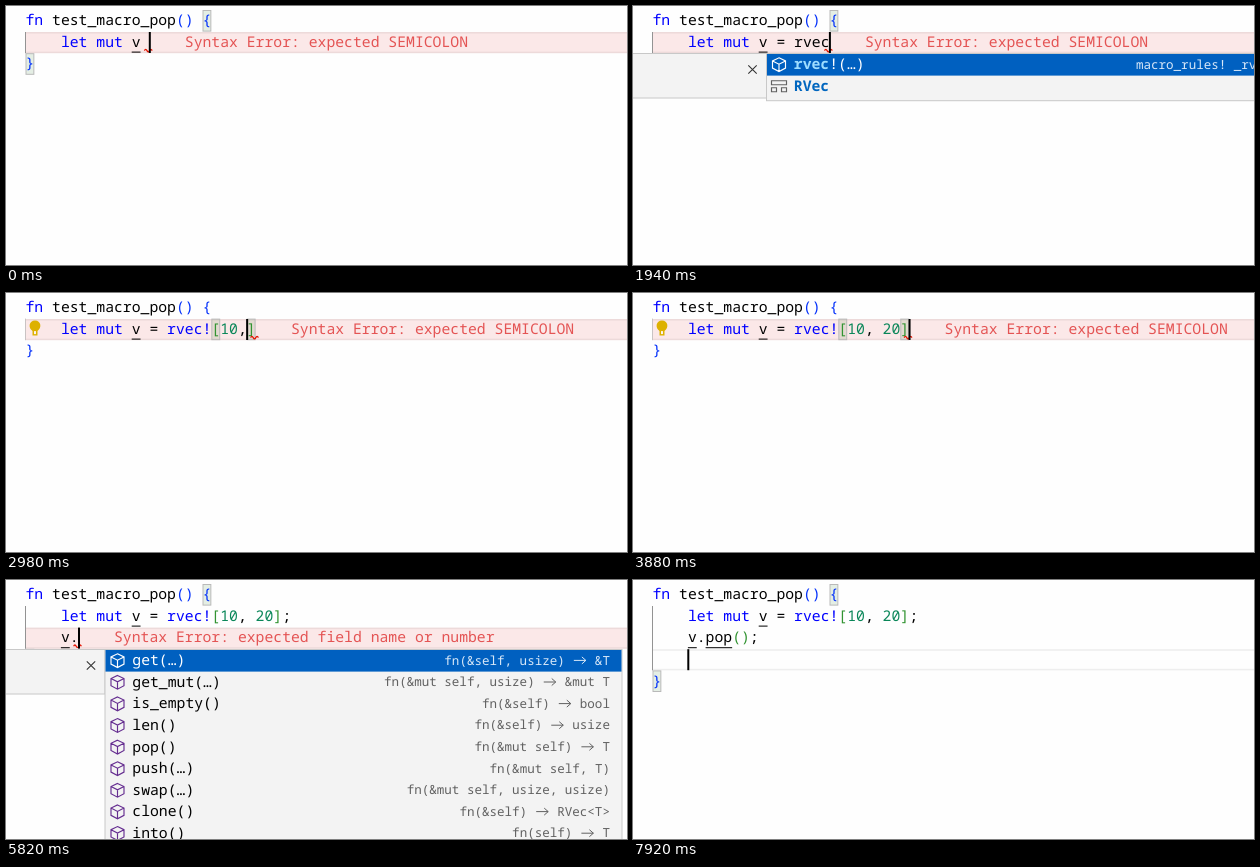
An HTML page for the animation above (8 s loop, 621x259 px).

```html
<!DOCTYPE html>
<html lang="en">
<head>
<meta charset="utf-8">
<title>Editor typing</title>
<style>
  html, body { margin: 0; width: 621px; height: 259px; overflow: hidden; background: #fefefe; }
  svg { display: block; }
  text {
    font: 14.75px "Noto Sans Mono", "DejaVu Sans Mono", monospace;
    white-space: pre;
    text-rendering: geometricPrecision;
    font-variant-ligatures: none;
  }
  text.detail { font-size: 12.55px; }
  .hit { font-weight: 700; }
</style>
</head>
<body>
<svg id="stage" width="621" height="259" viewBox="0 0 621 259"></svg>
<script>
const LOOP = 8000, CH = 8.85, SMALL = 7.53, ROW = 21.6, LEFT = 19.5;
const stage = document.getElementById('stage');
const colX = col => LEFT + col * CH;
const rowY = row => 4 + row * ROW;

const SEMI = 'Syntax Error: expected SEMICOLON';
const EXPR = 'Syntax Error: expected expression';
const DELIM = 'Syntax Error: expected `{`, `[`, `(`';
const FIELD = 'Syntax Error: expected field name or number';

// Completion entries: label, icon, signature
const macro = ['rvec!(…)', 'cube', 'macro_rules! _rvec'];
const struct = ['RVec', 'struct', ''];
const words = [
  ['range(…)', 'cube', 'fn(usize, usize) -> RVec<usize>'],
  ['range_r(…)', 'cube', 'fn(usize, usize) -> RVec<usize>'],
  ['return', 'keyword', ''],
  macro,
  struct,
  ['Result', 'enum', ''],
  ['RustcDecodable', 'ref', ''],
  ['RustcEncodable', 'ref', ''],
  ['AsRef', 'iface', ''],
  ['test_range_for(…)', 'cube', 'fn(usize, usize)']
];
const pop = ['pop()', 'cube', 'fn(&mut self) -> T'];
const push = ['push(…)', 'cube', 'fn(&mut self, T)'];
const methods = [
  ['get(…)', 'cube', 'fn(&self, usize) -> &T'],
  ['get_mut(…)', 'cube', 'fn(&mut self, usize) -> &mut T'],
  ['is_empty()', 'cube', 'fn(&self) -> bool'],
  ['len()', 'cube', 'fn(&self) -> usize'],
  pop,
  push,
  ['swap(…)', 'cube', 'fn(&mut self, usize, usize)'],
  ['clone()', 'cube', 'fn(&self) -> RVec<T>'],
  ['into()', 'cube', 'fn(self) -> T']
];
const menu = (x, query, items, doc = '') => ({ x, query, items, doc });

// Each step changes only the named parts of the state
const head = 'let mut v ';
const line = head + '= rvec![10, 20];';
const steps = [
  [0, { body: [head], back: 0, err: SEMI, caret: 1, pair: '{}', bulb: 0, hot: 0, menu: null }],
  [150, { body: [head + '='], err: EXPR }],
  [300, { body: [head + '= '] }],
  [750, { caret: 0 }],
  [1350, { body: [head + '= r'], caret: 1, err: SEMI }],
  [1490, { menu: menu(133.5, 'r', words, 'e>') }],
  [1640, { body: [head + '= rv'], menu: menu(133.5, 'rv', [macro, struct]) }],
  [1790, { body: [head + '= rve'], menu: menu(133.5, 'rve', [macro, struct]) }],
  [1940, { body: [head + '= rvec'], menu: menu(133.5, 'rvec', [macro, struct]) }],
  [2090, { body: [head + '= rvec!'], menu: menu(133.5, 'rvec!', [macro]) }],
  [2240, { err: DELIM, menu: null }],
  [2390, { body: [head + '= rvec![]'], back: 1, pair: '[]', bulb: 1 }],
  [2530, { err: SEMI }],
  [2680, { body: [head + '= rvec![1]'] }],
  [2830, { body: [head + '= rvec![10]'] }],
  [2980, { body: [head + '= rvec![10,]'] }],
  [3130, { body: [head + '= rvec![10, ]'] }],
  [3430, { body: [head + '= rvec![10, 2]'] }],
  [3580, { body: [head + '= rvec![10, 20]'] }],
  [3880, { back: 0 }],
  [4030, { body: [line], err: '', pair: '{}' }],
  [4330, { bulb: 0 }],
  [4480, { caret: 0 }],
  [4780, { body: [line, ''], caret: 1 }],
  [5220, { caret: 0 }],
  [5670, { body: [line, 'v'], caret: 1 }],
  [5820, { body: [line, 'v.'], err: FIELD, menu: menu(99, '', methods) }],
  [6120, { body: [line, 'v.p'], err: '', menu: menu(99, 'p', [pop, push, methods[2]]) }],
  [6270, { body: [line, 'v.po'], menu: menu(99, 'po', [pop]) }],
  [6420, { body: [line, 'v.pop'], menu: menu(99, 'pop', [pop]) }],
  [6720, { body: [line, 'v.pop()'], menu: null, pair: '()' }],
  [6870, { bulb: 1, hot: 1 }],
  [7170, { body: [line, 'v.pop();'], pair: '{}' }],
  [7470, { bulb: 0 }],
  [7620, { caret: 0 }],
  [7920, { body: [line, 'v.pop();', ''], caret: 1 }]
];

const esc = s => s.replace(/&/g, '&amp;').replace(/</g, '&lt;').replace(/>/g, '&gt;');
const text = (x, y, s, fill, cls = '') =>
  `<text x="${x}" y="${y}" fill="${fill}" class="${cls}">${esc(s)}</text>`;
const rect = (x, y, w, h, fill, more = '') =>
  `<rect x="${x}" y="${y}" width="${w}" height="${h}" fill="${fill}" ${more}/>`;
const path = (d, stroke, width = 1, fill = 'none') =>
  `<path d="${d}" stroke="${stroke}" stroke-width="${width}" fill="${fill}"/>`;

const icons = {
  cube: ['#652d90', 'M8 1.2 14.5 4.3V11.5L8 15 1.5 11.5V4.3ZM1.5 4.3 8 7.6 14.5 4.3M8 7.6V15'],
  keyword: ['#616161', 'M0 3.5H7M9 3.5H12M0 7.5H3M5 7.5H16M0 11.5H9M11 11.5H16M0 14.5H6'],
  struct: ['#616161', 'M.5 2.5H15.5V6.5H.5ZM.5 9.5H5.5V13.5H.5ZM10.5 9.5H15.5V13.5H10.5Z'],
  enum: ['#d67e00', 'M6.5 7V2.5H15.5V9.5H10M8.5 5H13.5M10 7.2H13.5M.5 7.5H9.5V14.5H.5ZM2.5 10H7.5M2.5 12.2H7.5'],
  ref: ['#616161', 'M5.5 5V1.5H12L15.5 5V14.5H5.5V12M11.5 1.5V5.5H15.5M.5 4.5V9.5H9M6 6.5 9 9.5 6 12.5'],
  iface: ['#007acc', 'M5 8H10M1 8a1.8 1.8 0 1 0 3.6 0a1.8 1.8 0 1 0-3.6 0M9.8 8a2.8 2.8 0 1 0 5.6 0a2.8 2.8 0 1 0-5.6 0']
};

function code(src, row, indent, hot) {
  const token = /\b(?:fn|let|mut)\b|rvec!|\d+|[\[\](){}]|\w+|[^\s\w]/g;
  const y = rowY(row);
  let out = '';
  for (const { 0: t, index } of src.matchAll(token)) {
    const x = colX(indent + index);
    let fill = '#000';
    if (/^(fn|let|mut|rvec!)$/.test(t)) fill = '#0000ff';
    else if (/^\d/.test(t)) fill = '#098658';
    else if (/[\[\](){}]/.test(t)) fill = indent ? '#319331' : '#0431fa';
    out += text(x, y + 15.2, t, fill);
    if (indent && (t === 'v' || (hot && t === 'pop')))
      out += rect(x, y + 20, t.length * CH, 1, '#000');
  }
  return out;
}

const bracketBox = (col, row) =>
  rect(colX(col) + .5, rowY(row) + .5, CH - 1, ROW - 1, 'rgba(0,100,0,.1)', 'stroke="#b9b9b9"');

function bulbIcon(y) {
  return path(`M26.5 ${y + 12.5}C21.8 ${y + 9} 23 ${y + 2} 29 ${y + 2}S36.2 ${y + 9} 31.5 ${y + 12.5}V${y + 17}H26.5Z`, 'none', 0, '#ddb100') +
    rect(28, y + 12.5, 2, 3, '#fdf3ee');
}

function signature(s, right, y, fill) {
  const x = right - s.length * SMALL, cut = s.indexOf('->');
  if (cut < 0) return text(x, y, s, fill, 'detail');
  const a = x + cut * SMALL + 1.5, b = a + 12, m = y - 4.2;
  return text(x, y, s.slice(0, cut), fill, 'detail') +
    path(`M${a} ${m}H${b}M${b - 4} ${m - 3.5} ${b} ${m} ${b - 4} ${m + 3.5}`, fill) +
    text(b + 1.5, y, s.slice(cut + 2), fill, 'detail');
}

function popup({ x, query, items, doc }, top) {
  const edge = 'stroke="#c8c8c8"', cx = x - 14, cy = top + 16.5;
  let out = rect(-2, top + .5, x + 2, 44.5, '#f3f3f3', edge) +
    text(0, top + 20.5, doc, '#616161') +
    path(`M${cx - 4.2} ${cy - 4.2}l8.4 8.4m0-8.4l-8.4 8.4`, '#333', 1.1) +
    rect(x, top + .5, 517, items.length * ROW + 4, '#f3f3f3', edge);
  items.forEach(([label, kind, sig], i) => {
    const y = top + 1 + i * ROW, on = i === 0, lx = x + 27.3;
    const [tint, d] = icons[kind];
    const at = query ? label.toLowerCase().indexOf(query) : -1;
    const ink = on ? '#fff' : '#000';
    if (on) out += rect(x + .5, y, 516, ROW, '#0060c0');
    out += `<g transform="translate(${x + 4.5} ${y + 2.6})">${path(d, on ? '#fff' : tint, 1.15)}</g>`;
    if (at < 0) out += text(lx, y + 15.2, label, ink);
    else {
      const end = at + query.length;
      out += text(lx, y + 15.2, label.slice(0, at), ink) +
        text(lx + at * CH, y + 15.2, label.slice(at, end), on ? '#9dddff' : '#0066bf', 'hit') +
        text(lx + end * CH, y + 15.2, label.slice(end), ink);
    }
    out += signature(sig, x + 505, y + 14.6, on ? '#d8e8f8' : '#616161');
  });
  return out;
}

function draw(s) {
  const row = s.body.length, src = s.body[row - 1], y = rowY(row);
  const end = 4 + src.length, x = colX(end);
  let out = rect(20, y + .4, 601, 1.6, '#eee') + rect(20, y + ROW - 1.6, 601, 1.6, '#eee');
  if (s.err) out += rect(20, y + .4, 601, ROW - .4, 'rgba(228,84,84,.13)');
  out += rect(19, rowY(1) + .4, 1, (row - (s.bulb ? 1 : 0)) * ROW - .4, '#939393');
  if (s.bulb) out += rect(19, y, 1, ROW, '#c9c3c3') + bulbIcon(y);

  if (s.pair === '{}') out += bracketBox(20, 0) + bracketBox(0, row + 1);
  else for (const b of s.pair) out += bracketBox(4 + src.indexOf(b), row);

  out += code('fn test_macro_pop() {', 0, 0);
  s.body.forEach((t, i) => { out += code(t, i + 1, 4, s.hot); });
  out += code('}', row + 1, 0);

  if (s.err) {
    out += text(colX(end + 4), y + 15.2, s.err, '#e45454') +
      path(`M${x - 5} ${y + 19}q1.3-2.4 2.6 0t2.6 0t2.6 0`, '#e51400', 1.3);
  }
  if (s.caret) out += rect(colX(end - s.back) - .6, y + .4, 2, ROW - .6, '#000');
  if (s.menu) out += popup(s.menu, Math.round(y + ROW));
  stage.innerHTML = out;
}

let state = {};
const states = steps.map(([, change]) => state = { ...state, ...change });
const start = performance.now();
let shown = -1;

function tick() {
  const t = (performance.now() - start) % LOOP;
  const i = steps.findLastIndex(([at]) => at <= t);
  if (i !== shown) draw(states[shown = i]);
  requestAnimationFrame(tick);
}
tick();
</script>
</body>
</html>
```
